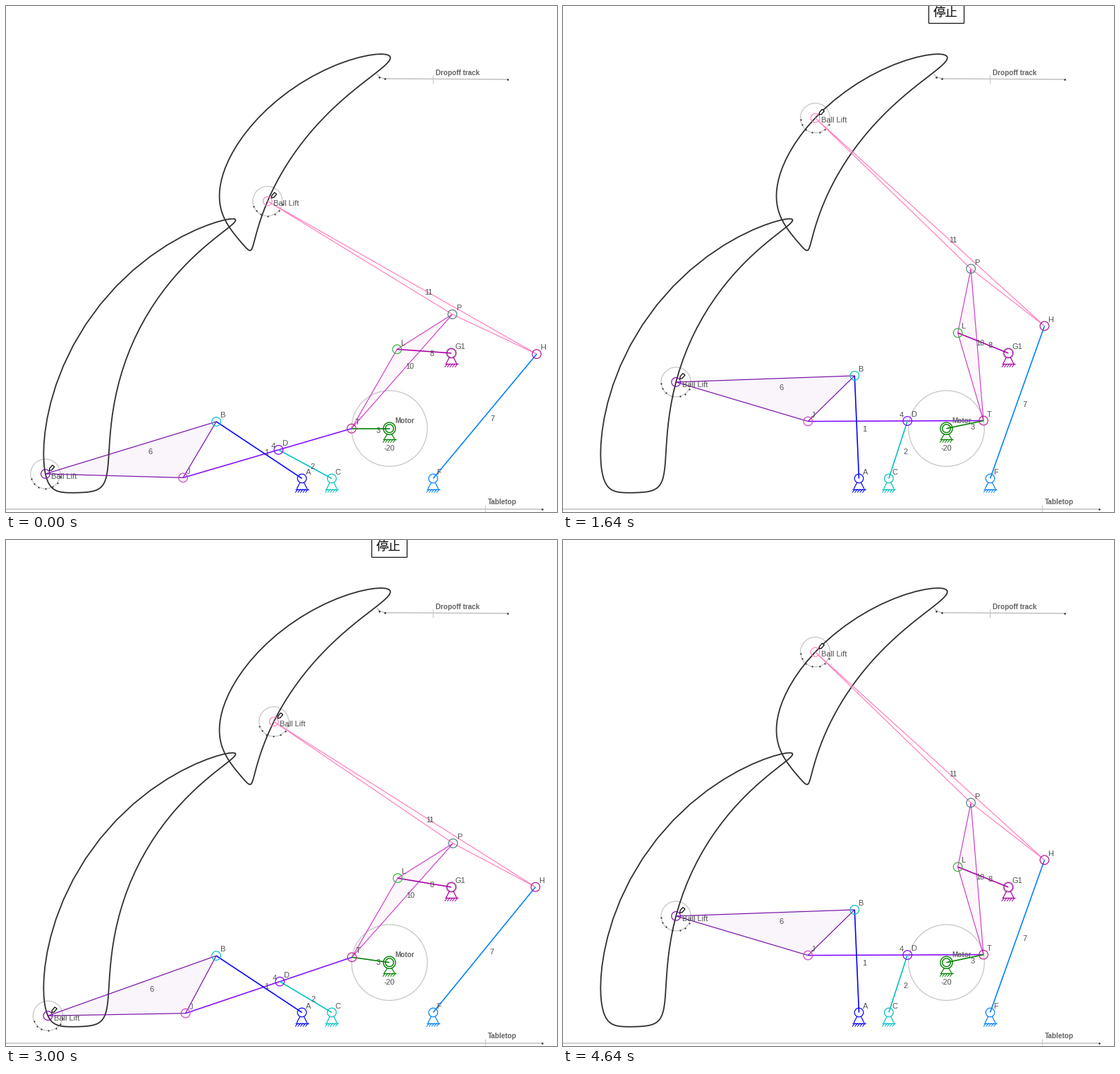
A matplotlib script that plays this animation: 781 px wide and 717 px high, repeating every 4730 ms.

```python
import numpy as np
import matplotlib.pyplot as plt
from matplotlib.animation import FuncAnimation
from matplotlib.colors import to_rgba
from matplotlib.patches import Circle, Polygon, Rectangle

W, H_PX, DPI = 781, 717, 100
LOOP, STEPS, SUB = 4730, 52, 4
PX = 72 / DPI

plt.rcParams["font.family"] = "Liberation Sans"
fig = plt.figure(figsize=(W / DPI, H_PX / DPI), dpi=DPI, facecolor="white")
ax = fig.add_axes([0, 0, 1, 1])
ax.set_xlim(-0.5, W - 0.5)
ax.set_ylim(H_PX - 0.5, -0.5)
ax.axis("off")

# Points are complex numbers, x + y*1j, with y pointing down.
MOTOR, A, C, F, G1 = 543 + 598.2j, 419 + 669j, 461.3 + 669j, 605 + 669j, 630.8 + 491.4j
CRANK = 53.7

BLUE, CYAN, GREEN, VIOLET = "#0000ff", "#00c0c0", "#008000", "#8000ff"
PURPLE, SKY, MAGENTA, ORCHID, PINK = "#7a10a8", "#0080ff", "#a800a8", "#d040c8", "#ff80c0"
GREY, DARK, TEXT = "#c4c4c4", "#303030", "#505050"

# Crank angle in degrees at chosen steps; the mechanism ticks in 4 degree stages.
KEY_STEP = [0, 1, 2, 3, 7, 18, 23, 32, 33, 45, 50, 51]
KEY_ANGLE = [0, 12, 12, 32, 76, 192, 244, 344, 352, 488, 536, 552]
TICK = 4
BUTTON_ON, BUTTON_OFF = 12, 51


def meet(p, q, a, b, side):
    """Point at distance a from p and b from q, on the given side of p-q."""
    d = np.abs(q - p)
    x = (a * a - b * b + d * d) / (2 * d)
    y = np.sqrt(a * a - x * x)
    return p + (q - p) / d * (x + 1j * side * y)


def solve(deg):
    t = MOTOR + CRANK * np.exp(1j * np.radians(180 - deg))
    d = meet(t, C, 107.8, 85.7, 1)
    j = t + (d - t) * 248.8 / 107.8
    b = meet(j, A, 92.4, 145.7, -1)
    low = meet(j, b, 195.2, 253.3, -1)
    l = meet(t, G1, 129.5, 77.2, -1)
    p = meet(t, l, 215.9, 92.75, 1)
    h = meet(p, F, 132.1, 229.4, -1)
    high = meet(p, h, 307.1, 438.65, -1)
    return dict(T=t, D=d, J=j, B=b, L=l, P=p, H=h, low=low, high=high)


def xy(points):
    z = np.asarray(points)
    return np.column_stack([z.real, z.imag])


def line(points, color, width=1.0, z=3):
    pts = xy(points)
    return ax.plot(pts[:, 0], pts[:, 1], color=color, lw=width * PX, zorder=z,
                   solid_capstyle="butt", solid_joinstyle="round")[0]


def ring(c, r, color, width=1.2, z=4):
    return ax.add_patch(Circle((c.real, c.imag), r, fill=False, ec=color,
                               lw=width * PX, zorder=z))


def dots(points, size=2.2, z=3):
    pts = xy(points)
    return ax.plot(pts[:, 0], pts[:, 1], "o", color=DARK, ms=size * PX, mew=0, zorder=z)[0]


def label(p, s, dx=0.0, dy=0.0, size=11, z=6, **kw):
    kw.setdefault("color", TEXT)
    return ax.text(p.real + dx, p.imag + dy, s, fontsize=size * PX,
                   va="baseline", zorder=z, **kw)


def title(p, s):
    return label(p, s, size=10, weight="bold", color="#646464")


def plate(points, color, tint):
    return ax.add_patch(Polygon(xy(points), closed=True, fc=to_rgba(color, tint), ec=color,
                                lw=1.2 * PX, joinstyle="round", zorder=3))


def ground(p, color, r=6.3):
    for s in (-1, 1):
        line([p + s * 2.8 + 1j * r * 0.9, p + s * 7.5 + 15j], color, 1.2)
    line([p - 9.5 + 15j, p + 9.5 + 15j], color, 1.3)
    for x in np.arange(-5.5, 10, 3.6):
        line([p + x + 15j, p + x - 4 + 20j], color)


def draw_static():
    path = solve(np.append(np.arange(0, 360, TICK), 0))
    for name in ("low", "high"):
        line(path[name], DARK, 1.8, z=2)

    line([525 + 96j, 529 + 100j, 536 + 102.5j, 710 + 103.5j], GREY, 1.6, z=1)
    line([604 + 97j, 604 + 109j], GREY, z=1)
    dots([528 + 100j, 536 + 102.5j, 710 + 103.5j], 2.6)
    title(608.5 + 97.5j, "Dropoff track")
    line([-1 + 712j, 759 + 712j], GREY, 1.6, z=1)
    line([678 + 706j, 678 + 718j], GREY, z=1)
    dots([759 + 712j], 2.6)
    title(682.7 + 706j, "Tabletop")

    ring(MOTOR, CRANK, GREY, 1.2, z=1)
    for p, name, color in ((A, "A", BLUE), (C, "C", CYAN), (F, "F", SKY), (G1, "G1", MAGENTA)):
        ground(p, color)
        ring(p, 6.3, color)
        label(p, name, 5, -5.8)
    ring(G1, 7.6, GREY, z=2)
    ground(MOTOR, GREEN, 8.5)
    ring(MOTOR, 8.6, GREEN, 1.4)
    ring(MOTOR, 5.8, GREEN, 1.4)
    title(MOTOR + 7.5 - 7.5j, "Motor")
    label(MOTOR, "-20", 0, 31, ha="center")


def ball(p, arm, rest, color):
    """Ball cradle that turns with its arm, plus the pen marking its path."""
    turn = np.degrees(np.angle(arm / rest))
    rim = np.radians(np.array([160, 140, 118, 90, 60, 38, 12]) + turn)
    pen = p + np.array([5.5 - 4.5j, 6 - 8j, 9.8 - 12.3j, 12.8 - 10j, 9 - 5.4j])
    body = Polygon(xy(pen), closed=True, fc="white", ec="black", lw=1.2 * PX, zorder=5)
    return [ring(p, 21, GREY, 1.2, z=1), dots(p + 21.2 * np.exp(1j * rim)),
            ring(p, 6.3, color), ax.add_patch(body), label(p, "Ball Lift", 8.5, 6.7)]


def number(points, s, shift=(7.5, 6.6)):
    return label(np.mean(points), s, *shift)


REST = solve(0)
JOINTS = {"B": CYAN, "J": ORCHID, "D": VIOLET, "T": "#c02090",
          "L": "#30b030", "P": "#508080", "H": "#b010a0"}
ABOVE = (0, -4.7)
moving = []


def draw(frame):
    while moving:
        moving.pop().remove()
    step = (frame + 1) // SUB % STEPS
    deg = TICK * round(float(np.interp(step, KEY_STEP, KEY_ANGLE)) / TICK)
    q = solve(deg)
    t, d, j, b, l, p, h = (q[n] for n in "TDJBLPH")
    low, high = q["low"], q["high"]

    moving.extend([
        plate([low, b, j], PURPLE, 0.04),
        plate([t, l, p], ORCHID, 0.04),
        plate([high, p, h], PINK, 0.03),
        number([low, b, j], "6", ABOVE),
        number([t, l, p], "10"),
        number([high, p, h], "11"),
        line([t, d, j], VIOLET, 1.5),
        number([t, d, j], "4", ABOVE),
    ])
    bars = ((A, b, BLUE, "1"), (C, d, CYAN, "2"), (MOTOR, t, GREEN, "3"),
            (F, h, SKY, "7"), (G1, l, MAGENTA, "8"))
    for start, end, color, name in bars:
        moving.append(line([start, end], color, 1.6))
        moving.append(number([start, end], name))
    for name, color in JOINTS.items():
        moving.append(ring(q[name], 6.3, color))
        moving.append(label(q[name], name, 5, -5.8))
    moving.extend(ball(low, low - j, REST["low"] - REST["J"], PURPLE))
    moving.extend(ball(high, high - p, REST["high"] - REST["P"], PINK))

    if BUTTON_ON <= step < BUTTON_OFF:
        box = Rectangle((517, -8), 50.5, 31, fc="white", ec="black", lw=1.1 * PX, zorder=7)
        moving.append(ax.add_patch(box))
        moving.append(label(541.7 + 14j, "停止", size=17.5, z=8, ha="center",
                            family="Noto Sans CJK JP", color="black"))
    return moving


draw_static()
anim = FuncAnimation(fig, draw, frames=STEPS * SUB, init_func=lambda: [],
                     interval=LOOP / (STEPS * SUB), repeat=True, repeat_delay=0)
plt.show()
```
